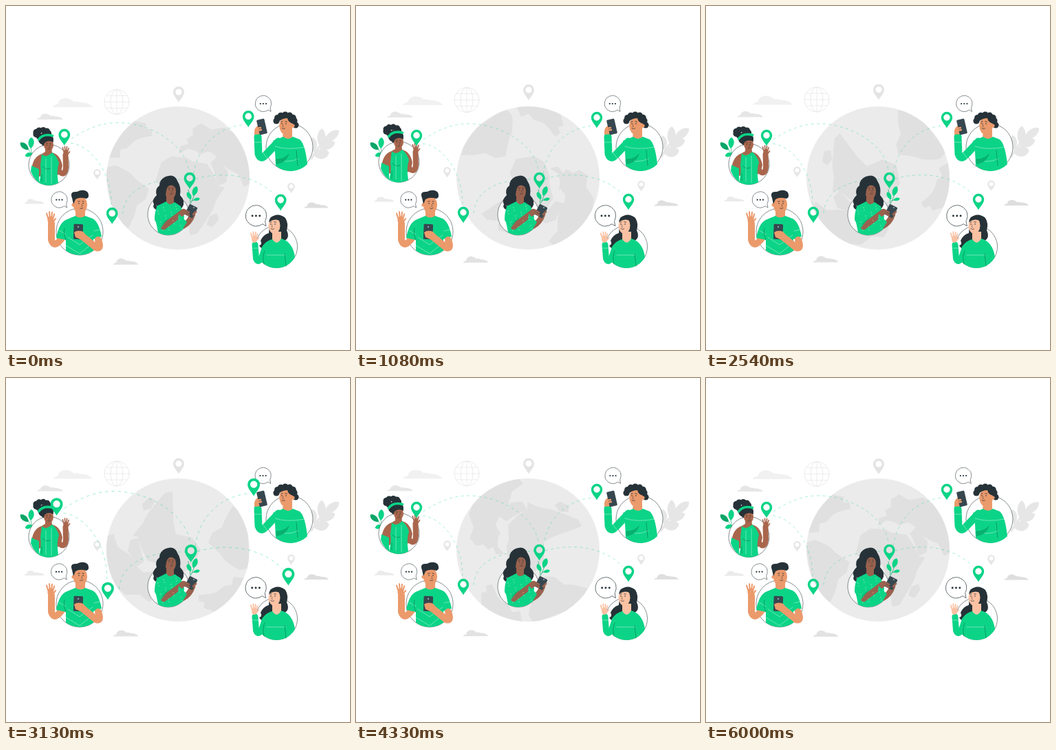
Write an HTML page that moves like this. It is 500x500 px and loops after 6.04 s.

```html
<!DOCTYPE html>
<html lang="en">
<head>
<meta charset="utf-8">
<title>Connected people</title>
<style>
html,body{margin:0;width:100%;height:100%;overflow:hidden;background:#fff}
svg{display:block;width:100vw;height:100vh}
</style>
</head>
<body>
<svg id="stage" viewBox="0 0 500 500" stroke-linecap="round" stroke-linejoin="round"></svg>
<script>
const LOOP = 6040, GREEN = '#0cd487', LEAF = '#0aa568', DARK = '#263238', PALE = '#e6e6e6';

// ---- drawing helpers ----
const path = (d, fill, extra = '') => `<path d="${d}" fill="${fill}" ${extra}/>`;
const line = (d, color, width, extra = '') => path(d, 'none', `stroke="${color}" stroke-width="${width}" ${extra}`);
const oval = (x, y, rx, ry, fill, extra = '') => `<ellipse cx="${x}" cy="${y}" rx="${rx}" ry="${ry}" fill="${fill}" ${extra}/>`;
const dot = (x, y, r, fill, extra) => oval(x, y, r, r, fill, extra);
const group = (body, attrs = '') => `<g ${attrs}>${body}</g>`;
const at = (x, y, body, more = '') => group(body, `transform="translate(${x} ${y}) ${more}"`);
const repeat = (count, draw) => Array.from({length: count}, (_, i) => draw(i)).join('');

const ring = (x, y, r) => dot(x, y, r, '#fff', `stroke="${DARK}" stroke-width=".55" stroke-dasharray="9 .8 3 .6"`);
const leaf = (x, y, length, width, angle, fill) => at(x, y, path(
  `M0 0C${width} ${-length * .3} ${width} ${-length * .8} 0 ${-length}C${-width} ${-length * .8} ${-width} ${-length * .3} 0 0Z`,
  fill), `rotate(${angle})`);
const pin = (x, y, size, fill) => at(x, y, path(
  'M0 15.5C-2 11-8.2 6-8.2 0A8.2 8.2 0 0 1 8.2 0C8.2 6 2 11 0 15.5ZM4.7 0A4.7 4.7 0 0 0-4.7 0A4.7 4.7 0 0 0 4.7 0Z',
  fill, 'fill-rule="evenodd"'), `scale(${size})`);
const cloud = (x, y, w, h, fill) => at(x, y, path(
  'M0 1Q.04.7.13.68C.14.2.25-.1.38.05Q.48.12.52.38Q.6.28.68.46Q.92.45 1 1Z', fill), `scale(${w} ${h})`);
const hand = (x, y, color, size = 1) => at(x, y,
  oval(0, 3, 4.2, 5.5, color) +
  line('M-3.4 1L-5.5-6M-1.2 0L-1.8-8M1.2 0L1.8-7.6M3 1L4.8-5M3.5 5L6.6 1', color, 1.9), `scale(${size})`);
const face = (x, y, width = 1, height = 1) => at(x, y,
  dot(-2, -1, .8, DARK) + dot(4, -1, .8, DARK) +
  line('M-3.4-3.8L-.8-4.2M3-4.2L5.2-3.7', DARK, .8) +
  line('M2 0L3 3.2L1.6 3.4', DARK, .45) + line('M-.5 6Q2 7.4 4 5.6', DARK, .7), `scale(${width} ${height})`);
const stripes = d => line(d, '#fff', .6, 'opacity=".65"');
const folds = d => line(d, '#08975f', .9);
const phone = (x, y, w, h, angle) => at(x, y,
  `<rect x="${-w / 2}" y="${-h / 2}" width="${w}" height="${h}" rx="1.5" fill="#37474f"/>`, `rotate(${angle})`);
const bubble = (x, y, r) => at(x, y,
  path('M7.5 9.3A12 12 0 1 1 10.4 6L11.5 11.7Z', '#fff', `stroke="${DARK}" stroke-width=".55" stroke-dasharray="8 .7 3 .5"`) +
  repeat(3, i => dot(4.2 * (i - 1), 0, 1.15, DARK)), `scale(${r / 12})`);

// ---- scenery ----
const clouds = () =>
  cloud(68, 134, 58, 13, '#f1f1f1') + cloud(45, 156.5, 38, 8.5, PALE) + cloud(26, 280.5, 30, 7, '#ebebeb') +
  cloud(155.5, 367, 37, 9, '#e2e2e2') + cloud(433, 285.5, 36, 8, '#dedede');

const wireGlobe = () => group(
  dot(161, 139.5, 18, 'none') + oval(161, 139.5, 9, 18, 'none') +
  line('M161 121.5V157.5M143 139.5H179M146 130.5H176M146 148.5H176', PALE, .7),
  `stroke="${PALE}" stroke-width=".8"`);

const greyPins = () => pin(251, 125, .97, '#e4e4e4') + pin(132.5, 242.3, .65, PALE) + pin(414.5, 262.3, .65, PALE);

const greyPlant = () => line('M444 222Q454 203 472 187', PALE, 3) +
  leaf(462, 198, 28, 8, 52, PALE) + leaf(458, 206, 28, 8, 2, PALE) +
  leaf(456, 207, 24, 8, 68, PALE) + leaf(447, 217, 23, 10, 80, PALE) + leaf(448, 213, 22, 7, -6, PALE);

const greenPlant = () => line('M33 209L40 219M36 206L39 220', LEAF, .6) +
  leaf(33, 209, 16, 5, -50, LEAF) + leaf(36, 207, 16, 5.5, 4, GREEN) + leaf(38, 214, 11, 4, -112, GREEN);

// Coastlines around the globe's own centre; the whole disc spins flat.
const AMERICAS = 'M-98 35L-105-14L-92-18L-84-15L-70-7L-62 2L-43 16L-47 30L-60 40L-64 55L-72 72L-92 60Z' +
  'M-105-30L-85-30L-84-42L-74-44L-64-54L-56-58L-38-62L-39-70L-48-71L-47-79L-75-85Z';
const AFRICA = 'M-24-22L-10-31L12-29L20-24L42-20L52-4L59 12L67 14L55 32L50 46L40 62L28 80L18 83L12 40L6 22L-18 20L-32 4Z' +
  'M42 68L46 56L56 52L59 60L50 71Z';
const EURASIA = 'M2-36L4-46L16-49L13-56L22-62L22-72L34-79L48-70L68-73L82-64L105-30L105 8L96 12L88-6L80-10L72-14L60-22L72-10' +
  'L70 6L59 10L53-10L48-22L57-31L46-39L34-36L30-42L34-34L26-40L14-43Z';

const globe = () => dot(250, 250, 104, '#ebebeb') + group(
  at(250, 250, group(path(AMERICAS + AFRICA + EURASIA, '#e0e0e0', 'stroke="#e0e0e0"'), 'id="land"')),
  'clip-path="url(#disc)"');

const routes = () => line(
  'M98 194C122 178 142 171 165 171C215 172 260 204 265 238M97 200C125 203 155 240 155 288' +
  'M171 301C173 273 198 250 262 252M272 244C278 207 302 179 343 174M275 251C305 242 355 241 388 274',
  GREEN, .6, 'stroke-dasharray="4 4.5" opacity=".6" stroke-linecap="butt"');
const pins = () => pin(88, 188, 1, GREEN) + pin(156, 300, 1, GREEN) + pin(266.5, 250, 1, GREEN) +
  pin(350, 162, 1, GREEN) + pin(396, 281, 1, GREEN);

// ---- people ----
function curlyWoman() {
  const skin = '#a9664c';
  const curls = repeat(9, i => dot(52.5 + 9 * Math.cos(i * .7), 185 + 4.5 * Math.sin(i * .7), 4.6, DARK));
  return ring(62.5, 231, 29.5) +
    line('M78 241Q86 248 87 234L86.5 217', skin, 8) + hand(87, 211, skin, .85) +
    path('M57 205H66L67 213Q79 216 82 232L79 245L46 248L37 238Q39 219 52 215L57 212Z', skin) +
    path('M52 215Q57 222 67 213Q73 217 77 228Q73 239 76 257A29.5 29.5 0 0 1 48 257Q52 242 50 232Z', GREEN) +
    path('M37 232L48 237L48 257Q39 250 36 240Z', GREEN) +
    folds('M53 233Q57 239 64 236M52 245V255') + stripes('M58 222V256M66 219V258') +
    curls + oval(58, 194, 11, 9, DARK) + oval(62, 202, 7, 9, skin) +
    path('M50 197Q53 189 68 192L69 198Q61 194 56 199L54 204Z', DARK) +
    line('M47.5 194Q54 185 67.5 188.5', GREEN, 3.6) + face(61, 203, .8, .8);
}

function phoneMan() {
  const skin = '#eb9a6c';
  return ring(107, 328, 34) +
    line('M66 316L66 340Q70 354 83 335', skin, 10) + hand(65, 308, skin, 1.08) +
    path('M101 295H115V309Q108 314 101 308Z', skin) +
    path('M89 310L101 305Q108 310 115 305L126 309Q135 314 139 335L127 339L127 355.500A34 34 0 0 1 87 355.500L87 340L73 337Q77 314 89 310Z', GREEN) +
    stripes('M87 348L107 360L128 343M90 336L107 347L126 333M77 326L87 332M128 327L137 325') + folds('M87 340Q83 330 85 323') +
    oval(108, 289, 10, 13.5, skin) + dot(98, 289, 2.6, skin) +
    path('M98 288L96 279Q92 269 103 270Q113 265 119 271Q122 278 117 280Q107 277 101 281Z', DARK) + face(108, 288) +
    line('M134 340Q139 354 131 351L110 334', skin, 10) +
    phone(105, 328, 13.5, 22, 2) + dot(105, 321, 1.2, '#90a4ae') +
    path('M99 329Q104 325 112 328L117 334L110 340L101 336Z', skin);
}

function selfieMan() {
  const skin = '#eb9a6c';
  const curls = repeat(7, i => dot(406 - 13 * Math.cos(i * .52), 167 - 9 * Math.sin(i * .52), 4.6, DARK));
  return ring(412, 205, 34) +
    path('M403 180H416V193Q408 199 402 192Z', skin) +
    line('M366 190L367 215Q370 225 378 216L396 197', GREEN, 11) +
    path('M388 196L403 190Q410 196 417 190L427 194Q435 201 438 230A34 34 0 0 1 392 232L391 212Z', GREEN) +
    stripes('M391 204Q408 210 434 205M391 222Q408 230 425 222M361 198L372 198M372 211L380 222') +
    folds('M422 210L424 232') + path('M393 230Q408 228 412 214Q402 224 392 222Z', '#08b06f') +
    curls + dot(421, 173, 4.5, DARK) +
    oval(407, 174, 9.8, 13, skin) + dot(417, 174, 2.6, skin) +
    path('M395 170Q393 159 405 157Q420 157 421 172L417 171Q410 169 409 163Q400 163 395 170Z', DARK) +
    face(405, 172, -1) +
    path('M361 187Q360 177 366 174L372 176L373 186Z', skin) + phone(372, 175.5, 11.5, 22, -13) +
    line('M364 178L370 177M364 181L371 180', skin, 2.4);
}

function longHairGirl() {
  const skin = '#fbc1a2';
  return ring(393, 350, 30.5) +
    path('M384 308Q395 299 406 308Q411 316 408 326Q413 337 405 341L388 337Q389 349 378 352Q371 354 368 348Q373 347 370 341Q373 333 382 330Z', DARK) +
    path('M387 328H400V341Q394 347 387 341Z', skin) +
    path('M367 366L372 350Q378 341 387 339Q394 349 400 338Q417 343 420 365A30.500 30.500 0 0 1 367 366Z', GREEN) +
    line('M362 347L363.500 367Q367 377 375 359', GREEN, 9) + hand(361, 336, skin, .95) +
    stripes('M379 362H406M359 352H367') + folds('M375 375Q372 364 376 356M405 360L407 378') +
    oval(390, 319, 8.5, 12, skin) +
    path('M382 314Q383 305 393 305Q404 307 402 327Q399 319 398 312Q390 308 382 314Z', DARK) + face(389, 318, -1);
}

function centreWoman() {
  const skin = '#99624e';
  const specks = repeat(22, i => dot(219 + i * 11 % 37, 290 + i * 7 % 37, .6, '#fff', 'opacity=".8"'));
  return ring(236, 303, 30) +
    path('M232 248Q245 243 249 254Q255 263 253 275Q262 284 256 293Q250 300 242 293L232 291Q229 300 220 297Q212 294 215 288Q211 282 219 275Q216 266 223 261Q223 252 232 248Z', DARK) +
    path('M233 274H244V289Q238 294 233 288Z', skin) +
    path('M219 291L233 284Q238 292 245 285L254 291L259 306L257 324A30 30 0 0 1 221 329Q219 318 217 310Z', GREEN) +
    oval(239, 269, 8, 12, skin) +
    path('M230 270Q228 254 241 254Q249 257 247 265Q241 258 236 262Q233 264 232 275L227 280Z', DARK) + face(239, 268, .85, .85) +
    line('M229 321L258 299', skin, 8.5) + path('M216 311Q216 293 223 289L231 295L234 311L224 324Z', GREEN) +
    line('M257 320Q267 315 271 303', skin, 8.5) + path('M251 302L263 314L256 326L249 322Z', GREEN) +
    specks + folds('M226 319L236 308') +
    line('M268 288Q268 277 265 267M269 286L277 267M270 283L276 281', LEAF, .7) +
    leaf(269, 281, 12, 4, -28, GREEN) + leaf(272, 276, 15, 5, 20, GREEN) + leaf(272, 282, 10, 3, 78, GREEN) +
    phone(269, 298, 13, 17, 28) + dot(273, 293, 1.1, '#90a4ae') +
    line('M260 297L266 300M261 301L266 304M272 303L276 299', skin, 2.8);
}

// ---- scene ----
const stage = document.getElementById('stage');
stage.innerHTML =
  `<clipPath id="disc">${dot(250, 250, 104, '#000')}</clipPath>` +
  group(clouds() + wireGlobe() + greyPins() + greyPlant(), 'id="backdrop"') + greenPlant() + globe() +
  group(routes(), 'class="beat"') +
  group(curlyWoman(), 'id="visitor"') + phoneMan() + longHairGirl() + centreWoman() +
  group(bubble(374, 142, 11.7) + bubble(77.5, 281.7, 11.7) + bubble(363.5, 305, 15.2), 'id="bubbles"') +
  group(pins(), 'class="beat"') + selfieMan();

const [land, backdrop, visitor, bubbles] =
  ['land', 'backdrop', 'visitor', 'bubbles'].map(id => document.getElementById(id));
const beats = [...stage.querySelectorAll('.beat')];
const move = (el, value) => el.setAttribute('transform', value);
const rise = (clock, period, height) => -height * (1 - Math.cos(clock / period * 2 * Math.PI)) / 2;

function draw(time) {
  const clock = time * 6000 / LOOP + 30;
  const scale = 1 + .1 * Math.max(0, 1 - Math.abs(clock % 1500 - 150) / 150);
  move(land, `rotate(${time / LOOP * 360})`);
  move(backdrop, `translate(0 ${rise(clock, 1500, 5.5)})`);
  move(visitor, `translate(0 ${rise(clock, 3000, 5.2)})`);
  move(bubbles, `translate(${-1.6 * Math.sin(clock / 3000 * 2 * Math.PI)} 0)`);
  beats.forEach(el => move(el, `translate(242 240) scale(${scale}) translate(-242 -240)`));
}

const began = performance.now();
function tick() {
  draw((performance.now() - began) % LOOP);
  requestAnimationFrame(tick);
}
tick();
</script>
</body>
</html>
```
